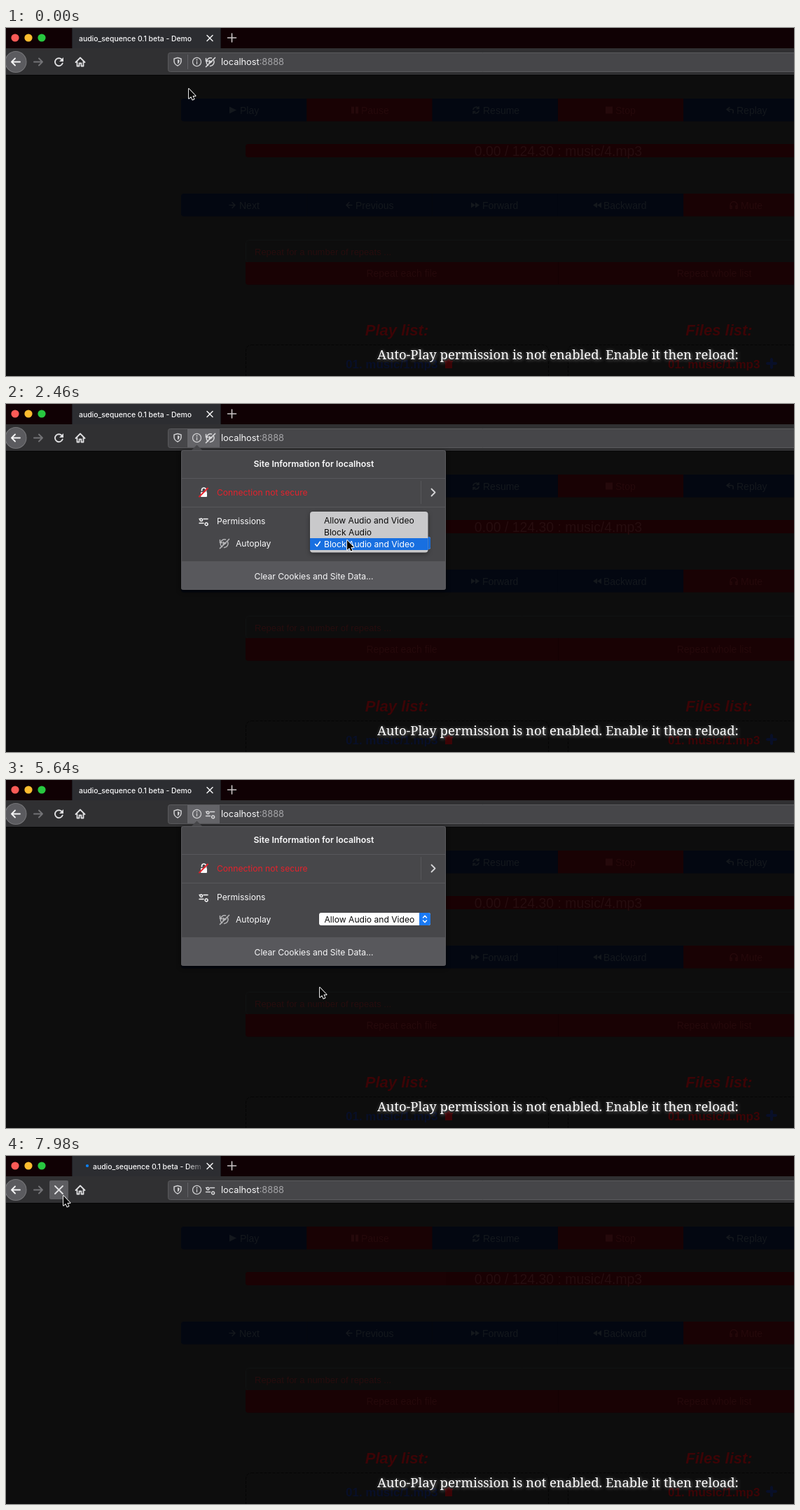
An HTML page with a canvas for the animation above (8 s loop, 1125 by 498 pixels).

```html
<!DOCTYPE html>
<html lang="en">
<head>
<meta charset="utf-8">
<title>Autoplay permission demo</title>
<style>
html, body { margin: 0; width: 100%; height: 100%; overflow: hidden; background: #0d0d0d; }
canvas { display: block; }
</style>
</head>
<body>
<canvas id="stage" width="1125" height="498"></canvas>
<script>
const ctx = document.getElementById('stage').getContext('2d');
const LOOP = 8000, STEP = 60;
const UI = 'Inter, sans-serif', PAGE = '"Liberation Sans", Arial, sans-serif';
const BLUE = '#030711', RED = '#190204', DIM = '#14181d', DIM_RED = '#25090b';
const HEAD_RED = '#3c0406', LINK_BLUE = '#080f28';

// Event times in ms
const POPUP_OPEN = 720, MENU_OPEN = 2100, CHOOSE = 4620, POPUP_CLOSE = 6120, LOAD = 7500;

// Pointer path: time, x, y
const POINTER = [
  [0, 260, 86], [120, 260, 86], [600, 286, 40], [780, 287, 38], [1080, 287, 38],
  [1700, 478, 192], [2040, 486, 194], [2940, 486, 194], [3720, 488, 166], [4740, 488, 166],
  [5340, 449, 294], [5640, 447, 296], [6060, 216, 206], [6420, 216, 206],
  [7020, 82, 57], [7200, 81, 56], [8000, 81, 56]
];

const clamp = v => Math.max(0, Math.min(1, v));
const smooth = v => v * v * (3 - 2 * v);

function pointerAt(t) {
  const i = Math.max(1, POINTER.findIndex(k => k[0] > t));
  const [t0, x0, y0] = POINTER[i - 1], [t1, x1, y1] = POINTER[i];
  const p = smooth(clamp((t - t0) / (t1 - t0)));
  return [x0 + (x1 - x0) * p, y0 + (y1 - y0) * p];
}

function box(x, y, w, h, fill, r = 0, stroke) {
  ctx.beginPath();
  ctx.roundRect(x, y, w, h, r);
  if (fill) { ctx.fillStyle = fill; ctx.fill(); }
  if (stroke) { ctx.strokeStyle = stroke; ctx.lineWidth = 1; ctx.stroke(); }
}

function dot(x, y, r, fill) {
  ctx.beginPath();
  ctx.arc(x, y, r, 0, Math.PI * 2);
  ctx.fillStyle = fill;
  ctx.fill();
}

function text(str, x, y, font, fill, align = 'left') {
  ctx.font = font;
  ctx.textAlign = align;
  ctx.fillStyle = fill;
  ctx.fillText(str, x, y);
}

// Icons are paths around their own centre
function line(d, x, y, color, width = 1.6) {
  ctx.save();
  ctx.translate(x, y);
  ctx.strokeStyle = color;
  ctx.lineWidth = width;
  ctx.lineCap = ctx.lineJoin = 'round';
  ctx.stroke(new Path2D(d));
  ctx.restore();
}

function shape(d, x, y, color) {
  ctx.save();
  ctx.translate(x, y);
  ctx.fillStyle = color;
  ctx.fill(new Path2D(d));
  ctx.restore();
}

const ARROW_L = 'M6 0H-6M-1 -5L-6 0L-1 5', ARROW_R = 'M-6 0H6M1 -5L6 0L1 5';
const ICON = {
  play: ['M-5 -5L5 0L-5 5Z', shape],
  pause: ['M-5 -5h4v10h-4zM1 -5h4v10h-4z', shape],
  sync: ['M-4 -1A4.3 4.3 0 0 1 4 -2M4 -5V-2H1M4 1A4.3 4.3 0 0 1 -4 2M-4 5V2H-1', line],
  stop: ['M-5 -5h10v10h-10z', shape],
  reply: ['M-1 -4L-5 -1L-1 2M-5 -1H2Q5 -1 4 4', line],
  next: ['M-4 0H4M0 -4L4 0L0 4', line],
  previous: ['M4 0H-4M0 -4L-4 0L0 4', line],
  forward: ['M-6 -4L0 0V-4L6 0L0 4V0L-6 4Z', shape],
  backward: ['M6 -4L0 0V-4L-6 0L0 4V0L6 4Z', shape],
  mute: ['M-5 4V0A5 5 0 0 1 5 0V4M-5 1h2v4h-2zM3 1h2v4h-2z', line]
};

// Each row: label, icon, icon x, label x, is red
const ROWS = [
  [101, [['Play', 'play', 324, 334], ['Pause', 'pause', 498, 507, 1], ['Resume', 'sync', 671, 681],
    ['Stop', 'stop', 861, 870, 1], ['Replay', 'reply', 1034, 1043]]],
  [237, [['Next', 'next', 323, 333], ['Previous', 'previous', 490, 499], ['Forward', 'forward', 670, 680],
    ['Backward', 'backward', 844, 853], ['Mute', 'mute', 1039, 1049, 1]]]
];

function drawPage(t) {
  box(0, 67, 1125, 431, '#0d0d0d');
  for (const [y, buttons] of ROWS) {
    buttons.forEach(([label, icon, ix, tx, red], i) => {
      const color = red ? DIM_RED : DIM, [path, draw] = ICON[icon];
      box(250 + i * 179.3, y, 179.3, 32.5, red ? RED : BLUE, i ? 0 : [4, 0, 0, 4]);
      draw(path, ix, y + 16.5, color);
      text(label, tx, y + 21.5, '14px ' + PAGE, color);
    });
  }

  box(342, 166, 800, 19, '#190103', 4);
  if (t >= POPUP_CLOSE) box(342, 166, 286, 19, '#1b0204', [4, 0, 0, 4]);
  text('0.00 / 124.30 : music/4.mp3', 788.5, 183, '19.4px ' + PAGE, '#260d0f', 'center');

  box(342.5, 303.5, 800, 32, '#0d0d0d', 4, '#111212');
  text('Repeat for a number of repeats ...', 355, 325, '13px ' + PAGE, '#270d0e');
  box(342, 335, 800, 32.5, RED, [0, 0, 0, 4]);
  box(788, 335, 1, 32, '#150103');
  text('Repeat each file', 565, 356, '14px ' + PAGE, DIM_RED, 'center');
  text('Repeat whole list', 1011, 356, '14px ' + PAGE, DIM_RED, 'center');

  const heading = 'italic bold 22px ' + PAGE;
  text('Play list:', 558, 440, heading, HEAD_RED, 'center');
  text('Files list:', 1018, 440, heading, HEAD_RED, 'center');
  ctx.setLineDash([4, 2]);
  box(342.5, 453.5, 432, 80, null, 8, '#050505');
  box(802.5, 453.5, 432, 80, null, 8, '#050505');
  ctx.setLineDash([]);
  text('01. music/1.mp3', 485, 487, 'bold 17px ' + PAGE, LINK_BLUE);
  text('01. music/1.mp3', 945, 487, 'bold 17px ' + PAGE, HEAD_RED);
  shape('M-6 -4H-2V-6H2V-4H6V-2H5V7H-5V-2H-6Z', 632, 480, HEAD_RED);
  line('M-6 0H6M0 -6V6', 1093, 480, LINK_BLUE, 4);
}

function drawCaption() {
  ctx.save();
  ctx.shadowColor = 'rgba(255,255,255,.6)';
  ctx.shadowBlur = 5;
  ctx.shadowOffsetX = ctx.shadowOffsetY = 1;
  text('Auto-Play permission is not enabled. Enable it then reload:', 530, 474,
    '18.5px "Noto Serif", serif', '#fff');
  ctx.restore();
}

function sliders(x, y, color) {
  line('M-6 -3h1.5M0 -3H6M-6 3H0M-2 -3a1.8 1.8 0 1 1 -.01 -.01M5.5 3a2 2 0 1 1 -.01 -.01', x, y, color, 1.5);
}

function autoplayIcon(x, y, color) {
  line('M-3 5A6 6 0 0 1 2 -5.5M5 -2.5A6 6 0 0 1 0 6M-6 -5V-1H-3', x, y, color, 1.5);
  shape('M-2 -3L3.5 0L-2 3Z', x, y, color);
  line('M-6 7L7 -6', x, y, color, 1.7);
}

function drawTab(t) {
  box(0, 0, 1125, 29, '#100104');
  ['#fc5b57', '#fdbc2f', '#28c840'].forEach((c, i) => dot(13 + i * 19, 14, 5.6, c));
  box(94, 0, 213, 29, '#1b1b1e');
  box(95, 0, 211, 29, '#2c2d31');
  const loading = t >= LOAD, x = loading ? 124 : 104;
  let color = '#f9f9fa';
  if (loading) {
    dot(112 + 4.5 * Math.cos((t - 7920) / 130), 14, 2.1, '#0a84ff');
    color = ctx.createLinearGradient(258, 0, 280, 0);
    color.addColorStop(0, '#f9f9fa');
    color.addColorStop(1, 'rgba(249,249,250,.15)');
  }
  ctx.save();
  ctx.beginPath();
  ctx.rect(100, 0, 179, 29);
  ctx.clip();
  text('audio_sequence 0.1 beta - Demo', x, 18.5, '500 10.4px ' + UI, color);
  ctx.restore();
  line('M-4 -4L4 4M4 -4L-4 4', 291, 14.5, '#f4f4f5', 1.5);
  line('M-6 0H6M0 -6V6', 322.5, 14, '#c9c5c6', 1.6);
}

function drawToolbar(t, px, py) {
  box(0, 29, 1125, 38, '#303032');
  box(0, 67, 1125, 1, '#060606');
  dot(14, 48.5, 15.5, '#77777a');
  dot(14, 48.5, 14.5, '#5b5b5f');
  line(ARROW_L, 14, 48.5, '#f4f4f5', 1.9);
  line(ARROW_R, 46, 48.5, '#737376', 1.9);

  if (px > 62 && px < 89 && py > 34 && py < 62) box(62, 35, 27, 27, '#5d5d61', 2);
  if (t >= LOAD) {
    line('M-5.5 -5.5L5.5 5.5M5.5 -5.5L-5.5 5.5', 75.5, 48.5, '#e0e0e2', 1.9);
  } else {
    line('M4.5 -3A5.5 5.5 0 1 0 5.2 2', 75.5, 48.5, '#e0e0e2', 1.9);
    shape('M6.5 -6.5V-.5H.5Z', 75.5, 48.5, '#e0e0e2');
  }
  line('M-6.5 .5L0 -6L6.5 .5M-4.5 0V6H-1.5V2H1.5V6H4.5V0', 106, 48.5, '#e0e0e2', 1.8);

  box(231.5, 35.5, 920, 27, '#464649', 3, '#5a5a5d');
  const hover = px >= 259 && px < 305 && py > 35 && py < 62;
  if (hover || (t >= POPUP_OPEN && t < POPUP_CLOSE)) box(259, 36, 46, 26, '#646468');
  else box(259, 38, 1, 21, '#626266');
  line('M0 -5.5L5 -4V0Q4.5 4 0 6Q-4.5 4 -5 0V-4Z', 245, 48, '#cfcfd1', 1.5);
  shape('M0 -3L2.6 -2V0Q2.2 2.4 0 3.5Z', 245, 48, '#cfcfd1');
  line('M6 0A6 6 0 1 1 6 -.01M0 -.6V3', 272.5, 48.5, '#cfcfd1', 1.2);
  dot(272.5, 45.5, 1, '#cfcfd1');
  (t < CHOOSE ? autoplayIcon : sliders)(291.5, 48.5, '#d8d8da');

  const font = '12.8px ' + UI;
  text('localhost', 307, 53, font, '#f9f9fa');
  text(':8888', 307 + ctx.measureText('localhost').width, 53, font, '#a5a5a8');
}

function drawSelect(label) {
  box(447, 190, 159, 18, '#fff', 3);
  box(590, 190, 16, 18, '#1b7af3', [0, 3, 3, 0]);
  line('M-2.5 -2L0 -4.7L2.5 -2M-2.5 2L0 4.7L2.5 2', 598, 199, '#fff', 1.4);
  text(label, 454.5, 203.5, '12.1px ' + UI, '#0b0b0b');
}

function drawMenu(py) {
  const items = ['Allow Audio and Video', 'Block Audio', 'Block Audio and Video'];
  const active = Math.max(0, Math.min(2, Math.floor((py - 158) / 17)));
  ctx.save();
  ctx.shadowColor = 'rgba(0,0,0,.4)';
  ctx.shadowBlur = 6;
  ctx.shadowOffsetY = 2;
  box(434, 154, 168.5, 58.5, '#c9c9cb', 4);
  ctx.restore();
  box(434, 158 + active * 17, 168.5, 17, '#186fe0');
  items.forEach((item, i) => {
    const color = i === active ? '#fff' : '#0b0b0b';
    text(item, 454, 170.5 + i * 17, '12.1px ' + UI, color);
    if (i === 2) line('M-3.5 0L-1 3L3.5 -3.5', 445, 200.5, color, 1.5);
  });
}

// The striped progress bar shines through while the popup fades
function drawStripes(alpha) {
  ctx.save();
  ctx.beginPath();
  ctx.rect(342, 167, 286, 19);
  ctx.clip();
  ctx.globalAlpha = 4 * alpha * (1 - alpha);
  box(342, 167, 286, 19, '#272727');
  for (let x = 332; x < 640; x += 28) shape('M0 19L18 0H32L14 19Z', x, 167, '#1d1d1d');
  ctx.restore();
}

function drawConnection(font, white, red) {
  line('M-2.5 -2V-3A2.5 2.5 0 0 1 3.5 -3V0', 282, 126, white, 1.7);
  box(278, 126, 9, 7, white, 1);
  line('M-6 6L6 -6', 282, 126.5, red, 1.9);
  text('Connection not secure', 301, 131, font, red);
}

function drawPopup(t, py) {
  const opening = clamp((t - POPUP_OPEN + 6) / 160);
  const alpha = opening * (1 - clamp((t - POPUP_CLOSE) / 120));
  if (!alpha) return;
  const font = '12.1px ' + UI, white = '#f9f9fa', rule = '#57575b';
  ctx.save();
  ctx.globalAlpha = alpha;
  ctx.translate(0, -Math.round(2 * (1 - opening)));

  ctx.save();
  ctx.shadowColor = 'rgba(0,0,0,.6)';
  ctx.shadowBlur = 6;
  ctx.shadowOffsetY = 2;
  box(250, 66, 378, 200, '#47474a', 3);
  ctx.restore();
  shape('M-8 0L0 -8L8 0Z', 272.5, 66.5, '#47474a');

  // Fine details appear later than the panel itself
  ctx.globalAlpha = alpha ** 3;
  box(250, 225.5, 378, 40, '#58585c', [0, 0, 3, 3]);
  box(250.5, 66.5, 377, 199, null, 3, '#5a5a5e');
  for (const y of [106, 147, 225]) box(251, y, 376, 1, rule);
  box(592, 110, 1, 33, rule);
  drawConnection(font, white, '#e5222c');
  if (alpha < 1) drawStripes(alpha);

  ctx.globalAlpha = alpha ** 0.8;
  text('Site Information for localhost', 439.5, 89.5, '600 12.3px ' + UI, white, 'center');
  line('M-2.5 -5L2.5 0L-2.5 5', 610, 126.5, '#d4d4d6', 1.8);
  sliders(282, 167.5, white);
  text('Permissions', 301, 171.5, font, white);
  autoplayIcon(311.5, 199.5, '#b4b4b6');
  text('Autoplay', 328, 203.5, font, white);
  text('Clear Cookies and Site Data…', 439.5, 250.5, font, white, 'center');

  ctx.globalAlpha = alpha ** 0.3;
  drawSelect(t < CHOOSE ? 'Block Audio and Video' : 'Allow Audio and Video');
  if (t >= MENU_OPEN && t < CHOOSE) drawMenu(py);
  ctx.restore();
}

function drawPointer(x, y) {
  const arrow = 'M1 1V14.8L4.2 11.9L6.3 16.6L8.5 15.6L6.4 11H10.6Z';
  line(arrow, x, y, '#fff', 1.8);
  shape(arrow, x, y, '#050505');
}

function frame(now) {
  const t = Math.floor((now % LOOP) / STEP) * STEP;
  const [px, py] = pointerAt(t);
  drawPage(t);
  drawCaption();
  drawTab(t);
  drawToolbar(t, px, py);
  drawPopup(t, py);
  drawPointer(px, py);
}

const start = performance.now();
function tick() {
  frame(performance.now() - start);
  requestAnimationFrame(tick);
}
tick();
</script>
</body>
</html>
```
